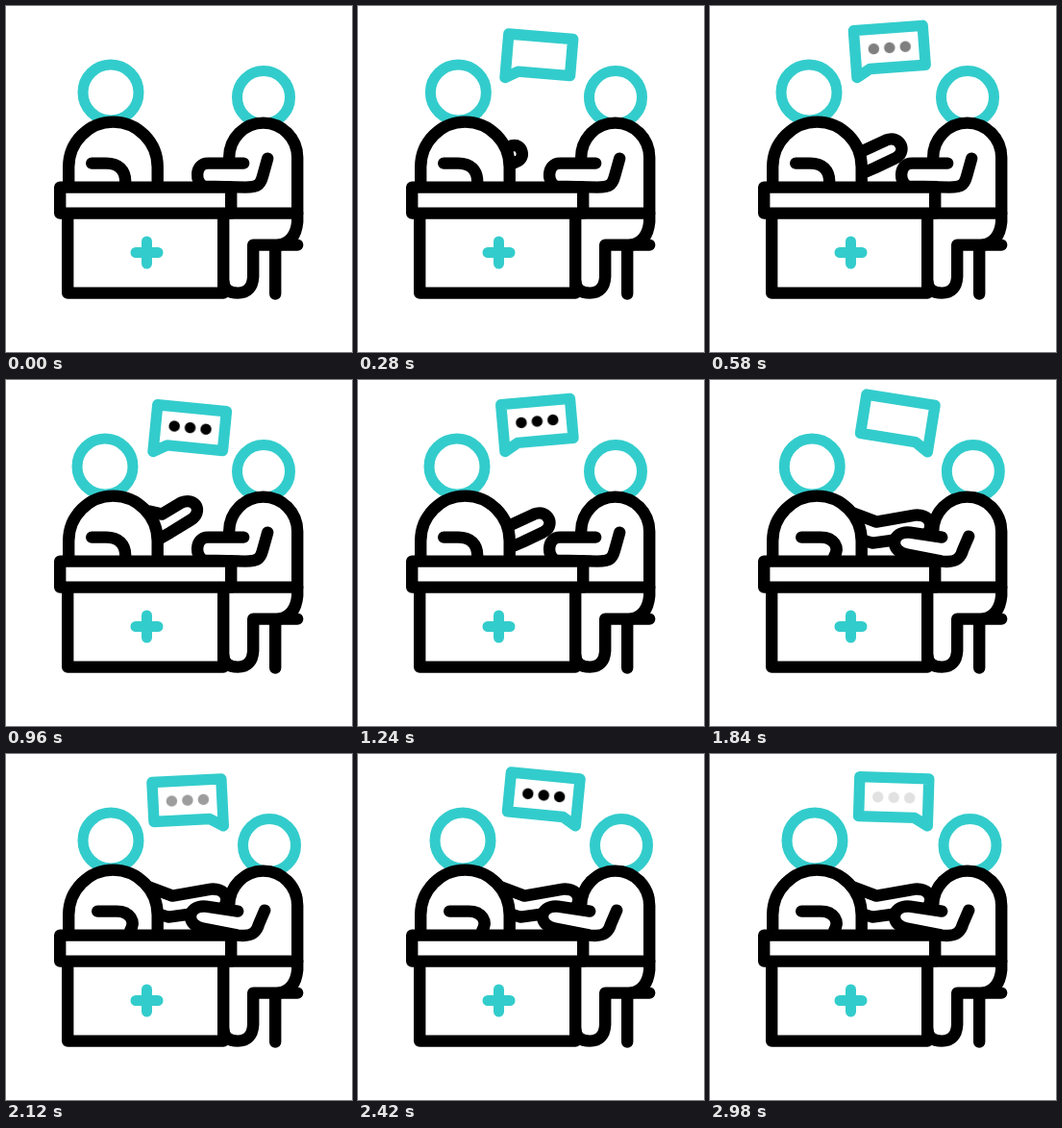
Recreate the animation shown at these times as an HTML page. Size 360 by 360 pixels, loop 3000 ms.

```html
<!DOCTYPE html>
<html lang="en">
<head>
<meta charset="utf-8">
<title>Consultation desk</title>
<style>
  html, body { margin: 0; width: 100%; height: 100%; overflow: hidden; background: #fff; }
  svg { display: block; width: 360px; height: 360px; }
  .ink { fill: none; stroke: #000; stroke-width: 12.4; stroke-linecap: round; stroke-linejoin: round; }
  .teal { fill: none; stroke: #3cc; stroke-width: 11; stroke-linecap: round; stroke-linejoin: round; }
  .solid { fill: #fff; }
  .bubble path { stroke-width: 11.4; vector-effect: non-scaling-stroke; }

  .move { animation: 3s ease-in-out infinite; }
  #headL { animation-name: headL; }
  #headR { animation-name: headR; }
  #armL { animation-name: armL; }
  #raised { animation-name: raised; }
  #armR { animation-name: armR; }
  #bubbleL { animation: swingL 3s ease-in-out infinite, sizeL 3s linear infinite; }
  #bubbleR { animation: swingR 3s ease-in-out infinite, sizeR 3s linear infinite; }
  #dotsL { animation: dotsL 3s linear infinite; }
  #dotsR { animation: dotsR 3s linear infinite; }

  @keyframes headL {
    0% { translate: 0 0; }
    14%, 54% { translate: -6px 0; }
    68%, 100% { translate: 0 0; }
  }
  @keyframes headR {
    0%, 49% { translate: 0 0; }
    63%, 82% { translate: 6px 0; }
    100% { translate: 2.5px 0; }
  }
  @keyframes armL {
    0%, 52% { d: path("M90 163L105 163C118 163 125 170 125 182"); }
    61%, 100% { d: path("M96 163L116 163C130 163 136 174 130 183"); }
  }
  @keyframes raised {
    0% { d: path("M130 148L135 150L140 150C148 150 148 165 140 165L135 166L130 168"); }
    19.3%, 41% { d: path("M148 146L158 151L184 139C199 133 207 152 193 158L172 168L158 174"); }
    32% { d: path("M150 136L163 139L183 127C199 121 206 137 193 145L172 158L158 166"); }
    50.7% { d: path("M150 138L160 150L184 142C201 136 207 156 193 161L172 169L158 174"); }
    60%, 100% { d: path("M150 138L174 147L214 140C240 138 236 174 192 166L170 169L156 165"); }
  }
  @keyframes armR {
    0%, 51% { d: path("M248 163L211 163C197 163 197 184 207 187L250 188C264 188 266 184 268 176L273 158"); }
    60%, 100% { d: path("M242 163L209 158C189 156 187 178 206 181L242 188C258 190 262 184 264 176L270 162"); }
  }
  @keyframes swingL {
    0% { rotate: 0deg; }
    11% { rotate: 5deg; }
    20.5% { rotate: -4.5deg; }
    31.3% { rotate: 5.7deg; }
    41.3% { rotate: -5deg; }
    50.7%, 100% { rotate: 1deg; }
  }
  @keyframes swingR {
    0%, 49% { rotate: 3deg; }
    62.5% { rotate: 9.2deg; }
    71.3% { rotate: -3deg; }
    80.7% { rotate: 5.6deg; }
    90.3% { rotate: -3deg; }
    100% { rotate: 1.8deg; }
  }
  @keyframes sizeL {
    0%, 0.6% { scale: 0; visibility: hidden; }
    10%, 46.67% { scale: 1; visibility: visible; }
    53.33%, 100% { scale: 0; visibility: hidden; }
  }
  @keyframes sizeR {
    0%, 49% { scale: 0; visibility: hidden; }
    58.67%, 100% { scale: 1; visibility: visible; }
  }
  @keyframes dotsL {
    0%, 16% { opacity: 0; }
    22.67%, 42% { opacity: 1; }
    46.67%, 100% { opacity: 0; }
  }
  @keyframes dotsR {
    0%, 68% { opacity: 0; }
    75%, 94.67% { opacity: 1; }
    100% { opacity: 0; }
  }
</style>
</head>
<body>
<svg viewBox="0 0 360 360">
  <defs>
    <g id="dots">
      <circle cx="19.5" cy="-28.5" r="5.7"/>
      <circle cx="36" cy="-28.5" r="5.7"/>
      <circle cx="52.5" cy="-28.5" r="5.7"/>
    </g>
  </defs>

  <g class="teal">
    <circle id="headL" class="move" cx="109" cy="90" r="29"/>
    <circle id="headR" class="move" cx="268" cy="95" r="27.5"/>
  </g>

  <g class="ink" transform="translate(-.8 .6)">
    <path id="raised" class="move solid" d="M130 148L135 150L140 150C148 150 148 165 140 165L135 166L130 168"/>
    <path class="solid" d="M66 185V167A46.25 47 0 0 1 158.5 167V185"/>
    <path id="armL" class="move" d="M90 163L105 163C118 163 125 170 125 182"/>

    <path class="solid" d="M233 157A35.5 36 0 0 1 304 157V224Q302 245 285 248H258V281Q257 298 242 298Q228 298 227 286" stroke="none"/>
    <path d="M233 157A35.5 36 0 0 1 304 157V224Q302 245 285 248"/>
    <path id="armR" class="move solid" d="M248 163L211 163C197 163 197 184 207 187L250 188C264 188 266 184 268 176L273 158"/>

    <path d="M304 248H258V281Q257 298 242 298Q228 298 227 286M281 248V299"/>
    <path class="solid" d="M65 215V298H227V215"/>
    <path class="solid" d="M57 188H235V215H57Z"/>
    <path d="M235 215H304"/>
  </g>

  <path class="teal" d="M135 256.500H158M146.500 245V268"/>

  <!-- each tail tip sits at its bubble's origin -->
  <g class="bubble" transform="translate(153 74.500)">
    <g id="bubbleL">
      <path class="teal" d="M0 0V-49H72V-8H14Z"/>
      <use id="dotsL" href="#dots"/>
    </g>
  </g>
  <g class="bubble" transform="translate(226.300 74.800)">
    <g id="bubbleR">
      <path class="teal" d="M0 0V-49H-72V-8H-14Z"/>
      <use id="dotsR" href="#dots" x="-72"/>
    </g>
  </g>
</svg>
</body>
</html>
```
